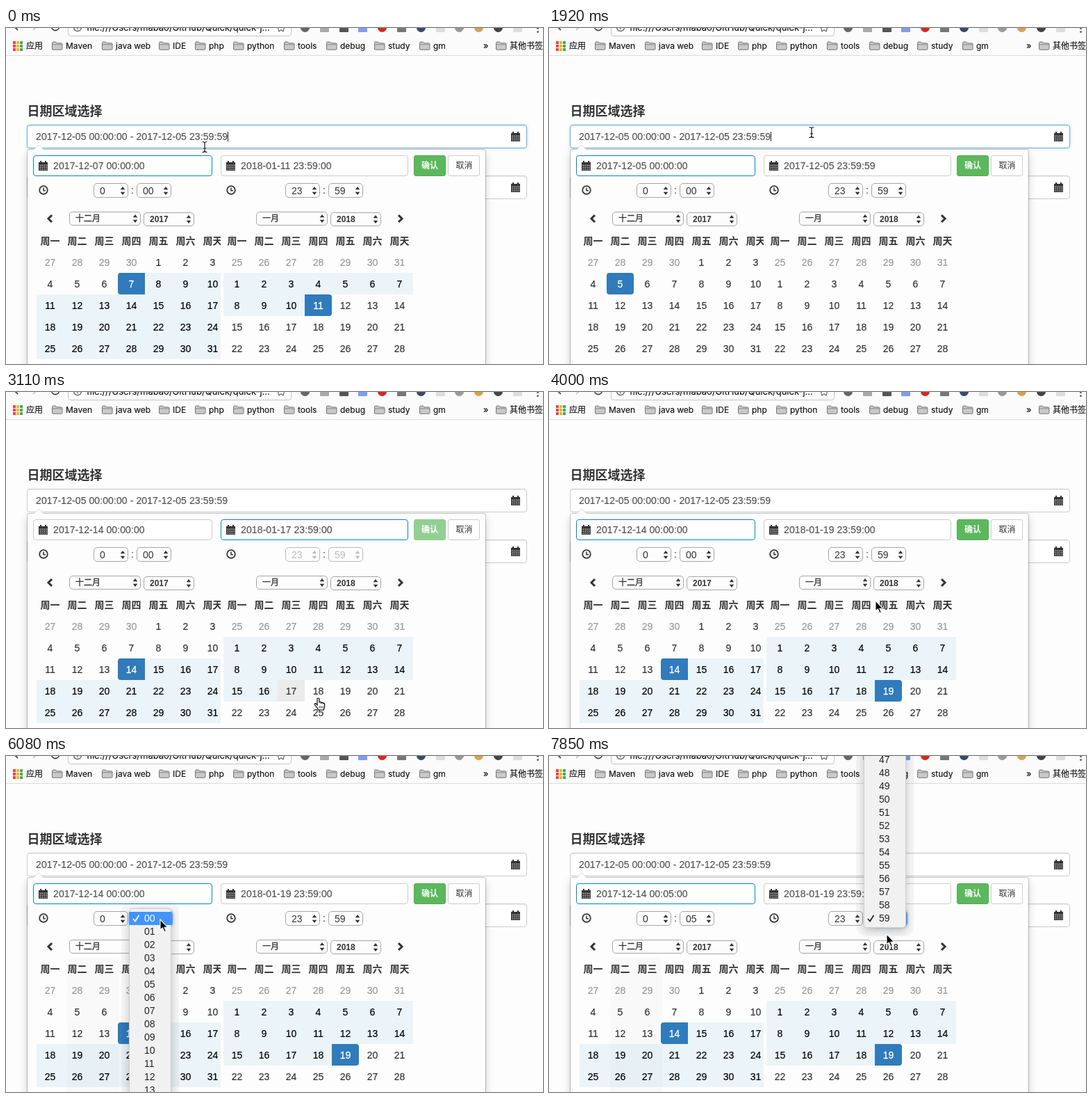
Recreate the animation shown at these times as an HTML page. Size 773 by 483 pixels, loop 7.99 s.

```html
<!DOCTYPE html>
<html lang="zh">
<head>
<meta charset="utf-8">
<title>日期区域选择</title>
<style>
html, body { margin: 0; width: 100%; height: 100%; overflow: hidden; background: #fdfdfd; }
#stage { position: absolute; left: 0; top: 0; width: 773px; height: 483px; overflow: hidden;
  font-family: "Liberation Sans", "Noto Sans CJK SC", "Noto Sans CJK", sans-serif; color: #333; }
#stage div, #stage svg { position: absolute; box-sizing: border-box; }
svg { overflow: visible; }
.t { white-space: pre; line-height: 20px; }
.ui { font-family: Inter, "Noto Sans CJK SC", "Noto Sans CJK", sans-serif; color: #111; -webkit-text-stroke: .15px; }
.date { color: #555; letter-spacing: .09px; -webkit-text-stroke: .2px; }
.bold { font-weight: bold; }
.field { background: #fff; border: 1px solid #ccc; border-radius: 4px; }
.field.main { box-shadow: inset 0 1px 1px rgba(0,0,0,.075); }
.field.on { border-color: #66afe9; box-shadow: inset 0 1px 1px rgba(0,0,0,.075), 0 0 4px rgba(102,175,233,.4); }
.field.fade { border-color: #8cc3ee; box-shadow: 0 0 3px rgba(102,175,233,.2); }
.field.pick { border-color: #08c; }
.popup { background: #fdfdfd; background-clip: padding-box; border: 1px solid rgba(0,0,0,.2); border-radius: 4px;
  box-shadow: 0 6px 12px rgba(0,0,0,.175); }
.sel { background: #fdfdfd; border: 1px solid #a6a6a6; border-radius: 5px; }
.ring { box-shadow: 0 0 0 2px #6ba7ea, 0 0 4px 2px rgba(80,150,235,.7); border-color: #5a9be6; }
.btn { border-radius: 3px; border: 1px solid #ccc; background: #fff; }
.cell { width: 39px; height: 31px; line-height: 33px; text-align: center; font-size: 14px; -webkit-text-stroke: .2px; }
.cell.bold { -webkit-text-stroke: 0; }
.menu { background: #f1f1f1; border: 1px solid rgba(0,0,0,.14); border-radius: 5px;
  box-shadow: 0 5px 12px rgba(0,0,0,.2), 0 1px 0 11px rgba(0,0,0,.03); }
</style>
</head>
<body>
<div id="stage"><div id="base"></div><div id="live"></div></div>
<script>
const LOOP = 7990, TICK = 148.1;

const box = (x, y, w, h, cls = '', css = '', inner = '') =>
  `<div class="${cls}" style="left:${x}px;top:${y}px;width:${w}px;height:${h}px;${css}">${inner}</div>`;
const text = (x, cy, size, s, cls = '', css = '') =>
  `<div class="t ${cls}" style="left:${x}px;top:${cy - 10}px;font-size:${size}px;${css}">${s}</div>`;
const svg = (x, y, inner) =>
  `<svg width="1" height="1" style="left:${x}px;top:${y}px">${inner}</svg>`;
const path = (d, fill = '#333', rest = '') => `<path d="${d}" fill="${fill}" ${rest}/>`;
const line = (d, color, w) => path(d, 'none', `stroke="${color}" stroke-width="${w}"`);

const calendar = (x, y) => {
  let dots = '';
  for (let r = 0; r < 3; r++)
    for (let c = 0; c < 4; c++) dots += `M${1.4 + c * 3} ${5.6 + r * 2.8}h1.9v1.6h-1.9z`;
  return svg(x, y, path('M0 2h2V0h2v2h5V0h2v2h2v12H0z') + path(dots, '#aaa'));
};
const clock = (x, y) => svg(x, y,
  '<circle r="5.8" fill="none" stroke="#333" stroke-width="1.8"/>' + line('M0-3.5V.7H3', '#333', 1.5));
const folder = x => svg(x, 19,
  path('M.5 2.5q0-1.5 1.5-1.5h3.5l1.5 1.8h6.5q1.5 0 1.5 1.5v6.7q0 1.2-1.3 1.2H1.8Q.5 12.2.5 11z', '#c9c9c9',
    'stroke="#757575"') + line('M.5 4.8H15', '#8a8a8a', 1));

const CURSOR = {
  beam: line('M-3-7.5Q0-7.5 0-5.5Q0-7.5 3-7.5M0-5.5V5.5M-3 7.5Q0 7.5 0 5.5Q0 7.5 3 7.5M-2 2H2', '#fff', 3) +
    line('M-3.5-7.5Q0-7.5 0-5.5Q0-7.5 3.5-7.5M0-5.5V5.5M-3.5 7.5Q0 7.5 0 5.5Q0 7.5 3.5 7.5M-2 2H2', '#111', 1.2),
  arrow: path('M0 0V15L3.4 12 6 17.8 8.4 16.7 5.9 11.2H10.6Z', '#000', 'stroke="#fff" stroke-width="1.1"'),
  hand: path('M0 1.5c0-2 3-2 3 0v5c.5-1.3 2.6-1 2.7.4.6-1 2.5-.7 2.6.7.8-.8 2.3-.3 2.3 1.2v3.5c0 2-1.2 3-1.2 4.7H1.5' +
    'C1 14.5-1.5 12.5-3.5 9.5c-1-1.7 1-2.6 2.2-1.2L0 9.8z', '#fff', 'stroke="#000" stroke-width="1.2"') +
    line('M3.2 11.5v3M5.6 11.5v3M8 11.5v3', '#000', .9)
};

// Pointer path: tick, shape, x, y
const PATH = [
  [0, 'beam', 286, 171], [3, 'beam', 450, 190], [5, 'arrow', 610, 196], [7, 'arrow', 671, 192],
  [8, 'arrow', 671, 193], [11, 'beam', 378, 150], [13, 'beam', 378, 150], [14, 'arrow', 330, 220],
  [16, 'hand', 176, 394], [17, 'hand', 178, 392], [20, 'hand', 420, 425], [21, 'hand', 448, 440],
  [23, 'hand', 484, 428], [25, 'hand', 484, 428], [26, 'hand', 490, 436], [27, 'arrow', 470, 300],
  [29, 'arrow', 330, 193], [31, 'arrow', 130, 245], [33, 'arrow', 168, 270], [34, 'arrow', 171, 269],
  [37, 'arrow', 171, 269], [39, 'arrow', 160, 234], [41, 'arrow', 222, 235], [42, 'arrow', 222, 235],
  [44, 'arrow', 215, 328], [47, 'arrow', 447, 259], [50, 'arrow', 484, 236], [51, 'arrow', 485, 236],
  [53, 'arrow', 486, 256], [54, 'arrow', 486, 256]
];

// Days are counted from 1 December, so 32 is 1 January
const EVENTS = [
  [0, { open: 1, focus: 'on', start: 7, end: 42, sec: '00', min: '00' }],
  [7, { press: 1, focus: 'fade' }],
  [8, { open: 0, press: 0, focus: '' }],
  [13, { open: 1, focus: 'on', start: 5, end: 5, sec: '59' }],
  [17, { focus: '', start: 14, end: 14, sec: '00', picking: 1 }],
  [24, { picking: 0, end: 50 }],
  [34, { menu: 'month', ring: 'month' }],
  [38, { menu: '', ring: '' }],
  [39, { menu: 'hour', ring: 'hour' }],
  [40, { menu: '', ghost: 1 }],
  [41, { menu: 'min', ring: 'min' }],
  [45, { menu: '' }],
  [48, { min: '05', ring: '' }],
  [51, { menu: 'endMin', ring: 'endMin' }]
];

const pad = n => String(n).padStart(2, '0');
const range = (n, f) => Array.from({ length: n }, (_, i) => f(i));
const MONTHS = '一 二 三 四 五 六 七 八 九 十 十一 十二'.split(' ').map(m => m + '月');
const MENUS = {
  month: { x: 80, w: 104, cy: 274, h: 17, size: 12, tx: 21, sel: 11, items: MONTHS },
  hour: { x: 115, w: 61, cy: 233, h: 19, size: 14, tx: 22, sel: 0, items: range(24, String) },
  min: { x: 177, w: 61, cy: 233, h: 19, size: 14, tx: 22, sel: 0, items: range(60, pad) },
  endMin: { x: 453, w: 61, cy: 233, h: 19, size: 14, tx: 22, sel: 59, items: range(60, pad) }
};

function pointer(tick) {
  let i = 0;
  while (i < PATH.length - 2 && PATH[i + 1][0] <= tick) i++;
  const [t0, shape, x0, y0] = PATH[i], [t1, , x1, y1] = PATH[i + 1];
  const k = Math.max(0, (tick - t0) / (t1 - t0));
  return { shape, x: Math.round(x0 + (x1 - x0) * k), y: Math.round(y0 + (y1 - y0) * k) };
}

function dayAt({ shape, x, y }) {
  const row = Math.floor((y - 352) / 31) + 1;
  if (shape !== 'hand' || row < 1) return 0;
  return x < 309 ? row * 7 + Math.floor((x - 44) / 39) - 3 : 31 + (row - 1) * 7 + Math.floor((x - 313) / 39) + 1;
}

const dateText = d => d > 31 ? '2018-01-' + pad(d - 31) : '2017-12-' + pad(d);

function select(x, y, w, h, value, size, css = '', ring = false, off = false) {
  const color = off ? '#bbb' : '#333', cy = y + h / 2;
  const arrows = path('M-3.3-1.8L0-6 3.3-1.8zM-3.3 1.8L0 6 3.3 1.8z', color);
  return box(x, y, w, h, 'sel' + (ring ? ' ring' : ''), off ? 'border-color:#b8b8b8' : '') +
    text(x + 9, cy, size, value, '', `color:${color};${css}`) + svg(x + w - 8.5, cy, arrows);
}

function cells(side, s, hover) {
  let out = '';
  range(7, i => out += `<div class="cell bold" style="left:${i * 39}px;top:-47px">周${'一二三四五六天'[i]}</div>`);
  for (let k = 0; k < 35; k++) {
    const off = side ? k < 7 : k < 4;
    const label = side ? (off ? 25 + k : k - 6) : (off ? 27 + k : k - 3);
    const day = off ? -1 : label + side * 31;
    const active = day === s.start || (!s.picking && day === s.end);
    let css = off ? 'color:#999' : '';
    if (active) {
      const r = s.start === s.end ? '4px' : day === s.start ? '4px 0 0 4px' : '0 4px 4px 0';
      css = `background:#307bbb;color:#fff;border-radius:${r};-webkit-text-stroke:.3px #fff`;
    } else if (day === hover && day > 0) css = 'background:#ebebeb';
    else if (day > s.start && day < s.end) css = 'background:#ebf4f8;color:#000';
    out += `<div class="cell" style="left:${k % 7 * 39}px;top:${Math.floor(k / 7) * 31 - 16}px;${css}">${label}</div>`;
  }
  const inner = box(0, 47, 273, 160, '', '', out);
  return box(side ? 313 : 44, 290, side ? 273 : 265, 193, '', 'overflow:hidden', inner);
}

function menu({ x, w, cy, h, size, tx, sel, items }, p) {
  const top = cy - h / 2 - sel * h;
  const hit = p.x >= x && p.x <= x + w ? Math.floor((p.y - top) / h) : -1;
  let out = box(x, top - 4.5, w, items.length * h + 9, 'menu');
  items.forEach((item, i) => {
    const y = top + i * h, color = i === hit ? '#fff' : '#222';
    if (y < -h || y > 483) return;
    if (i === hit) out += box(x, y, w, h, '', 'background:#4295fb');
    out += text(x + tx, y + h / 2, size, item, '', `color:${color}`);
    if (i === sel) out += svg(x + 6, y + h / 2, line('M0 1L3 4.5 8.5-4', color, 1.8));
  });
  return out;
}

function popup(s, hover) {
  const chevron = d => line(d, '#333', 3);
  let out = box(30, 174, 661, 330, 'popup') +
    svg(47, 168, path('M-7 7L0 0 7 7z', '#fdfdfd') + line('M-7 6.5L0 0 7 6.5', '#ddd', 1)) +
    box(39, 183, 258, 30, 'field' + (s.picking ? '' : ' pick')) + calendar(47, 191) +
    text(68, 198, 14, `${dateText(s.start)} 00:${s.min}:00`, 'date') +
    box(309, 183, 270, 30, 'field' + (s.picking ? ' pick' : '')) + calendar(317, 191) +
    text(338, 198, 14, `${dateText(s.end)} 23:59:${s.sec}`, 'date') +
    box(587, 183, 46, 30, 'btn', `background:#5cb85c;border-color:#4cae4c;opacity:${s.picking ? .65 : 1}`) +
    text(598, 198, 12, '确认', 'bold', 'color:#fff') +
    box(636, 183, 46, 30, 'btn' + (s.press ? ' ring' : ''), s.press ? 'background:#d4d4d4' : '') +
    text(647.5, 198, 12, '取消');
  out += clock(54, 233) + select(126, 223, 50, 21, '0', 14, '', s.ring === 'hour') + text(180, 233, 14, ':') +
    select(188, 223, 50, 21, s.min, 14, '', s.ring === 'min') +
    clock(324, 233) + select(402, 223, 50, 21, '23', 14, '', false, s.picking) + text(456, 233, 14, ':') +
    select(464, 223, 50, 21, '59', 14, '', s.ring === 'endMin', s.picking);
  const bold = 'font-weight:bold', mid = '-webkit-text-stroke:.3px';
  out += svg(63, 273.5, chevron('M3-5L-2 0 3 5')) + select(91, 264, 103, 20, '十二月', 12, mid, s.ring === 'month') +
    select(198, 265, 73, 20, '2017', 12, bold) + select(360, 264, 103, 20, '一月', 12, mid) +
    select(467, 265, 73, 20, '2018', 12, bold) + svg(568, 273.5, chevron('M-3-5L2 0-3 5'));
  out += cells(0, s, hover) + cells(1, s, hover);
  if (s.ghost) out += box(88, 290, 75, 193, '', 'background:rgba(0,0,0,.015)');
  return out;
}

function page(s) {
  return box(30, 139, 720, 34, 'field main ' + s.focus) +
    text(43, 156, 14, '2017-12-05 00:00:00 - 2017-12-05 23:59:59', 'date') +
    (s.focus === 'on' ? box(319, 149, 1, 14, '', 'background:#222') : '') + calendar(727, 149) +
    text(30.5, 193, 18, '日期选择', 'bold') + box(30, 212, 720, 34, 'field main') +
    text(43, 229, 14, '2017-12-05', 'date') + calendar(727, 222);
}

function browser() {
  let out = box(0, 0, 773, 40, '', 'background:#fbfbfb;border-bottom:1px solid #dcdcdc') +
    svg(13, -2, line('M4 5L-2-1', '#555', 2)) + svg(43, -2, line('M-4 5L2-1', '#ccc', 2)) +
    svg(71, -2, '<circle r="5.5" fill="none" stroke="#555" stroke-width="1.8"/>') +
    box(89, -18, 322, 30, '', 'background:#fff;border:1px solid #c4c4c4;border-radius:4px') +
    svg(103, -1, '<circle r="5.5" fill="none" stroke="#666" stroke-width="1.4"/>' + line('M0-4V3', '#666', 1.4)) +
    box(116, -12, 272, 24, '', 'overflow:hidden', text(0, 11, 13, 'file:///Users/mabao/GitHub/Quick/quick-j...', 'ui')) +
    svg(396, -1, line('M-5-1L-3 6 0 3.5 3 6 5-1', '#666', 1.2));
  '#666 #aaa #555 #7f9cf0 #d8281e #777 #35496b #ddd #999 #d9a24a #444 #ddd'.split(' ').forEach((c, i) => {
    const round = [0, 4, 6, 8, 9, 10].includes(i);
    out += box(424 + i * 27.8, -8, 13, 14, '', `background:${c};border-radius:${round ? 7 : 1}px`);
  });
  out += box(764, -1, 3, 3, '', 'background:#666;border-radius:2px') + box(764, 4, 3, 3, '', 'background:#666;border-radius:2px');
  const dots = ['#e8453c', '#f0b429', '#3cab5a', '#4387f0'];
  range(9, i => out += box(10 + i % 3 * 5, 19 + Math.floor(i / 3) * 5, 3.6, 3.6, '',
    `background:${dots[(i + Math.floor(i / 3)) % 4]}`));
  out += text(29, 26, 12, '应用', 'ui');
  const marks = { 86: 'Maven', 158: 'java web', 240: 'IDE', 292: 'php', 347: 'python', 420: 'tools',
    481: 'debug', 550: 'study', 615: 'gm', 725: '其他书签' };
  for (const x in marks) out += folder(x - 20) + text(x, 26, 12, marks[x], 'ui');
  return out + text(687, 25, 13, '»', 'ui') + text(30.5, 120, 18, '日期区域选择', 'bold');
}

function render(tick) {
  const s = Object.assign({}, ...EVENTS.filter(e => e[0] <= tick).map(e => e[1]));
  const p = pointer(tick);
  // Hover lags one step behind the pointer
  const hover = s.open ? dayAt(pointer(tick - 1)) : 0;
  if (s.picking && hover > s.start) s.end = hover;
  return page(s) + (s.open ? popup(s, hover) : '') + (s.menu ? menu(MENUS[s.menu], p) : '') + svg(p.x, p.y, CURSOR[p.shape]);
}

const live = document.getElementById('live');
document.getElementById('base').innerHTML = browser();
const t0 = performance.now();
let shown = -1;
function frame() {
  const t = (performance.now() - t0) % LOOP;
  const tick = Math.min(53, Math.floor((t + 10) / TICK));
  if (tick !== shown) live.innerHTML = render(shown = tick);
  requestAnimationFrame(frame);
}
frame();
</script>
</body>
</html>
```
